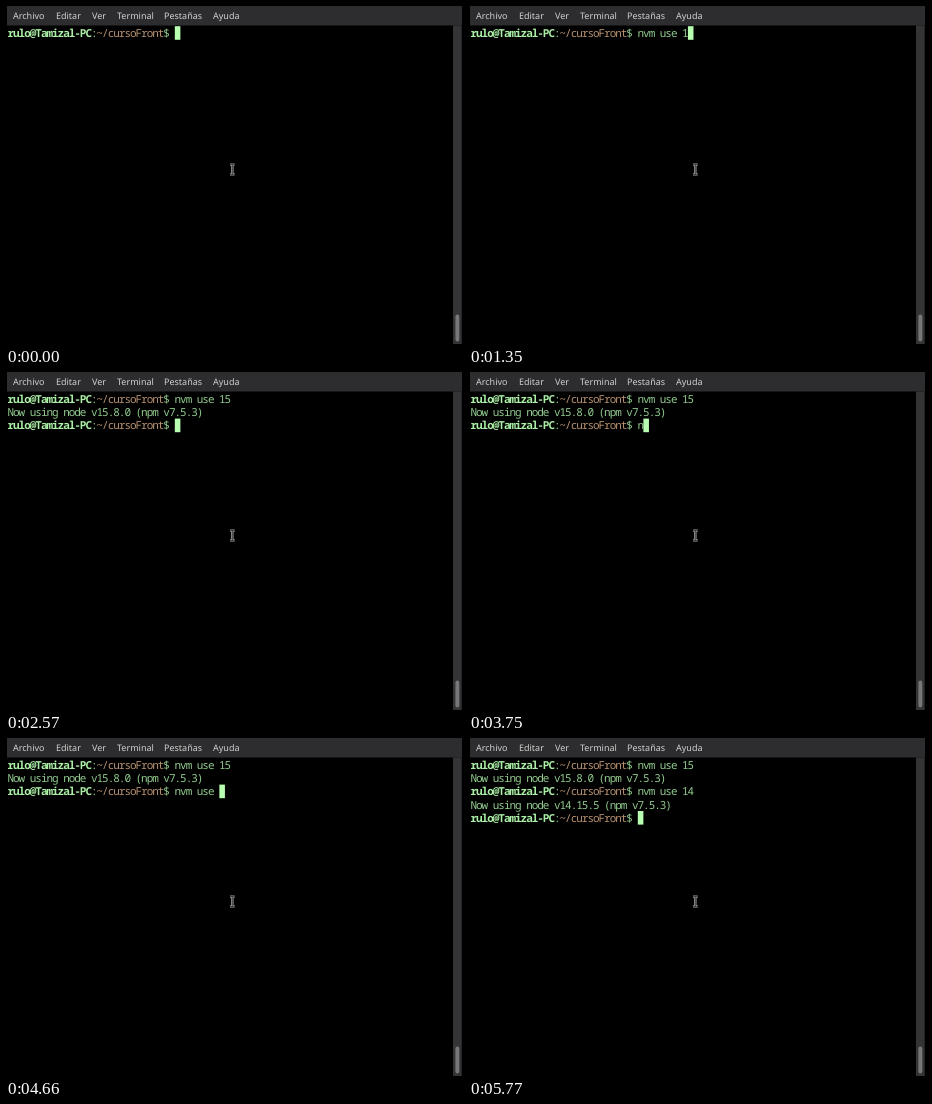
These frames come from a looping animation (457x338 px, 6680 ms). An HTML page with a canvas:

```html
<!DOCTYPE html>
<html lang="es">
<head>
<meta charset="utf-8">
<title>Terminal</title>
<style>
  html, body { margin: 0; width: 100%; height: 100%; overflow: hidden; background: #000; }
  canvas { display: block; width: 457px; height: 338px; }
</style>
</head>
<body>
<canvas id="stage" width="457" height="338"></canvas>
<script>
const ctx = document.getElementById('stage').getContext('2d');
const LOOP = 6680;
const CELL = { x: 2, y: 20.3, w: 5.567, h: 13.2 };
const MONO = '11px "Noto Sans Mono", "DejaVu Sans Mono", monospace';
const GREEN = '#92cb8f', BRIGHT = '#abefa6', TAN = '#b59070';

const MENU = [['Archivo', 7], ['Editar', 50], ['Ver', 86],
              ['Terminal', 111], ['Pestañas', 158], ['Ayuda', 207]];
const PROMPT = [['rulo@Tamizal-PC', BRIGHT, '600 '], [':', GREEN],
                ['~/cursoFront', TAN], ['$ ', GREEN]];

// keys: time at which each typed character appears
const RUNS = [
  { text: 'nvm use 15', keys: [60, 180, 240, 360, 420, 540, 600, 1050, 1290, 1530],
    enter: 1900, reply: 'Now using node v15.8.0 (npm v7.5.3)', replyAt: 2330, promptAt: 2390 },
  { text: 'nvm use 14', keys: [3750, 3810, 3930, 4180, 4300, 4420, 4480, 4600, 4720, 4960],
    enter: 5140, reply: 'Now using node v14.15.5 (npm v7.5.3)', replyAt: 5590, promptAt: 5650 }
];

function rect(x, y, w, h, color) {
  ctx.fillStyle = color;
  ctx.fillRect(x, y, w, h);
}

// Writes text on the character grid and returns the next column.
function write(text, col, row, color = GREEN, weight = '') {
  ctx.font = weight + MONO;
  ctx.fontStretch = 'condensed';
  ctx.fillStyle = color;
  ctx.textAlign = 'center';
  for (const ch of text) {
    ctx.fillText(ch, CELL.x + (col + 0.5) * CELL.w, CELL.y + row * CELL.h + 10.6);
    col++;
  }
  return col;
}

function writePrompt(row) {
  return PROMPT.reduce((col, [text, color, weight]) => write(text, col, row, color, weight), 0);
}

function drawWindow() {
  rect(0, 0, 457, 338, '#000');
  rect(1, 0, 455, 19.5, '#2d2d2f');
  rect(447, 19.5, 8.7, 318.5, '#343436');

  ctx.font = '9px "Noto Sans", sans-serif';
  ctx.fontStretch = 'normal';
  ctx.textAlign = 'left';
  ctx.fillStyle = '#d0d0d0';
  for (const [label, x] of MENU) ctx.fillText(label, x, 13.2);

  ctx.fillStyle = '#777779';
  ctx.beginPath();
  ctx.roundRect(449.4, 308.5, 3.9, 27, 2);
  ctx.fill();
}

// A light text pointer with a dark core.
function drawPointer() {
  const beam = new Path2D('M224 158.6H228.6 M226.3 158.6V168.4 M224 168.4H228.6');
  for (const [width, color] of [[2.4, '#a6a6a6'], [0.8, '#222']]) {
    ctx.lineWidth = width;
    ctx.strokeStyle = color;
    ctx.stroke(beam);
  }
}

function drawSession(t) {
  let row = 0;
  let col = writePrompt(row);
  for (const run of RUNS) {
    const typed = run.keys.filter(k => t >= k).length;
    col = write(run.text.slice(0, typed), col, row);
    if (t < run.enter) break;
    row++;
    col = 0;
    if (t < run.replyAt) break;
    write(run.reply, 0, row++);
    if (t < run.promptAt) break;
    col = writePrompt(row);
  }
  rect(CELL.x + col * CELL.w - 0.2, CELL.y + row * CELL.h - 0.1, CELL.w, CELL.h + 0.4, '#b9ffb2');
}

const start = performance.now();

function frame() {
  const t = (performance.now() - start) % LOOP;
  ctx.textRendering = 'geometricPrecision';
  drawWindow();
  drawSession(t);
  drawPointer();
  requestAnimationFrame(frame);
}
frame();
</script>
</body>
</html>
```
